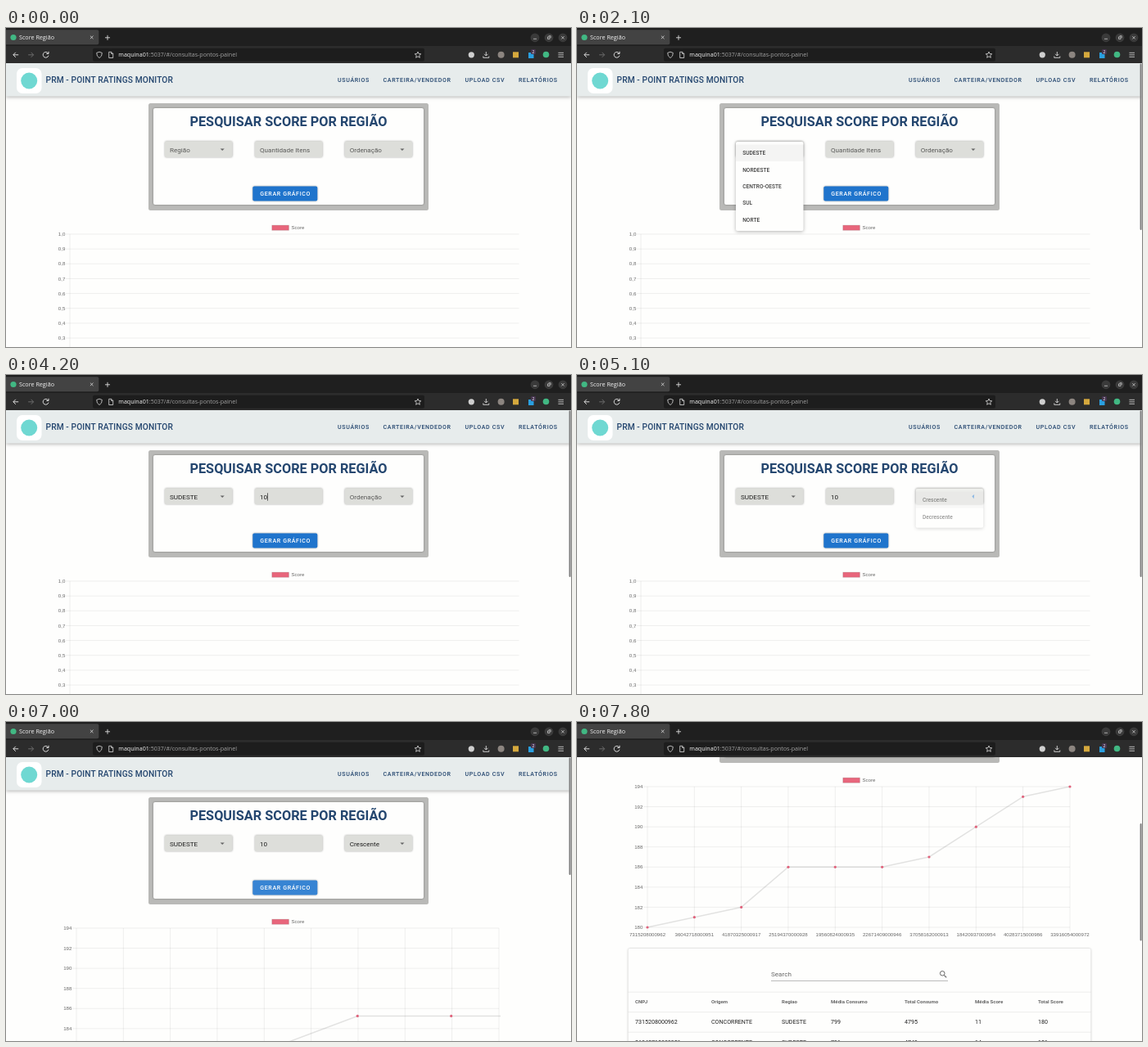
These frames come from a looping animation (690x390 px, 8000 ms). An HTML page:

```html
<!DOCTYPE html>
<html lang="pt">
<head>
<meta charset="utf-8">
<title>Score Região</title>
<style>
html, body { margin: 0; width: 100%; height: 100%; overflow: hidden; background: #fefefe; }
svg { display: block; width: 690px; height: 390px; }
text { font-family: Roboto, sans-serif; white-space: pre; }
.ui { font-family: "Open Sans", sans-serif; }
.chart { font-family: "Liberation Sans", Arial, sans-serif; font-size: 6.1px; fill: #666; }
.caps { font-size: 7.1px; font-weight: 500; letter-spacing: .64px; }
.field { font-size: 8.1px; }
.item { font-size: 6.6px; font-weight: 500; }
.sh1 { filter: drop-shadow(0 .8px .8px rgba(0,0,0,.35)); }
.sh2 { filter: drop-shadow(0 1.6px 2px rgba(0,0,0,.3)); }
</style>
</head>
<body>
<svg id="stage" viewBox="0 0 690 390">
  <defs>
    <clipPath id="view"><rect y="43" width="690" height="347"/></clipPath>
    <clipPath id="plot"><rect x="85" y="251" width="519" height="174.5"/></clipPath>
  </defs>
</svg>
<script>
(() => {
const LOOP = 8000;
const stage = document.getElementById('stage');

function el(parent, tag, attrs = {}, txt) {
  const n = document.createElementNS('http://www.w3.org/2000/svg', tag);
  set(n, attrs);
  if (txt !== undefined) n.textContent = txt;
  parent.appendChild(n);
  return n;
}
function set(n, attrs) { for (const k in attrs) n.setAttribute(k, attrs[k]); }
const box = (p, x, y, width, height, fill, rx = 0, more) =>
  el(p, 'rect', { x, y, width, height, fill, rx, ...more });
const dot = (p, cx, cy, r, fill) => el(p, 'circle', { cx, cy, r, fill });
const label = (p, x, y, txt, cls, fill, more) => el(p, 'text', { x, y, class: cls, fill, ...more }, txt);
const line = (p, d, stroke, w = 1, more) =>
  el(p, 'path', { d, stroke, 'stroke-width': w, fill: 'none', ...more });
const show = (n, on) => n.setAttribute('visibility', on ? 'visible' : 'hidden');

const clamp = v => Math.max(0, Math.min(1, v));
const ramp = (t, a, b) => clamp((t - a) / (b - a));
const smooth = v => v * v * (3 - 2 * v);

// cubic-bezier(.25, .8, .25, 1)
function swift(x) {
  if (x <= 0 || x >= 1) return clamp(x);
  let lo = 0, hi = 1;
  for (let i = 0; i < 24; i++) {
    const s = (lo + hi) / 2;
    if (.75 * s * (1 - s) + s ** 3 < x) lo = s; else hi = s;
  }
  const s = lo, u = 1 - s;
  return 2.4 * u * u * s + 3 * u * s * s + s ** 3;
}

// ---- page ----
const view = el(stage, 'g', { 'clip-path': 'url(#view)' });
box(view, 0, 43, 690, 347, '#fefefd');
const page = el(view, 'g');
const ink = 'rgba(0,0,0,.87)', dim = 'rgba(0,0,0,.6)', navy = '#24466f';

box(page, 0, 42, 690, 41.5, '#e7ecec', 0, { class: 'sh2' });
box(page, 13, 49, 30.5, 31, '#fff', 7);
dot(page, 28.2, 64.5, 10, '#6fd8d2');
label(page, 48.5, 67.4, 'PRM - POINT RATINGS MONITOR', '', navy,
  { 'font-size': 10.2, 'font-weight': 500, 'letter-spacing': .13 });
[[405, 'USUÁRIOS'], [460.5, 'CARTEIRA/VENDEDOR'], [560.5, 'UPLOAD CSV'], [626, 'RELATÓRIOS']]
  .forEach(([x, s]) => label(page, x, 66.3, s, 'caps', navy));

// ---- chart ----
const TOP = 252, BOTTOM = 424, LEFT = 86, STEP = 57.33, RIGHT = LEFT + 9 * STEP;
const scores = [180, 181, 182, 186, 186, 186, 187, 190, 193, 194];
const ids = ['7315208000962', '36042718000951', '41870325000917', '25194370000928', '19560824000935',
  '22671409000946', '37058162000913', '18420937000954', '40283715000986', '33916054000972'];
const grid = 'rgba(0,0,0,.11)';

box(page, 324.8, 241.2, 20.6, 6.1, '#e8667c', 0, { stroke: 'rgba(0,0,0,.12)', 'stroke-width': 1 });
label(page, 348.4, 246.2, 'Score', 'chart', '#666');

function axis(g, left, right, step, count, name) {
  for (let i = 0; i < count; i++) {
    const y = TOP + i * step;
    line(g, `M${left - 5} ${y}H${right}`, grid, .6);
    label(g, left - 5.7, y + 2.1, name(i), 'chart', '#666', { 'text-anchor': 'end' });
  }
}
const blank = el(page, 'g');
axis(blank, 78, 626.5, 18.15, 9, i => ((10 - i) / 10).toFixed(1).replace('.', ','));
line(blank, 'M78 252V433', grid, .6);

const filled = el(page, 'g');
axis(filled, LEFT, RIGHT, (BOTTOM - TOP) / 7, 8, i => 194 - 2 * i);
ids.forEach((id, i) => {
  const x = LEFT + i * STEP;
  line(filled, `M${x} ${TOP}V${BOTTOM + 5}`, grid, .6);
  label(filled, x, 435.1, id, 'chart', '#666', { 'text-anchor': 'middle' });
});
const plot = el(filled, 'g', { 'clip-path': 'url(#plot)' });
const curve = line(plot, '', 'rgba(0,0,0,.11)', 1.5, { 'stroke-linejoin': 'round' });
const marks = scores.map(() => dot(filled, 0, 0, 1.6, '#e0637c'));

// left: share of the entry motion still to go
function drawChart(left) {
  const spread = 1 + 8 * left;
  const pts = scores.map((v, i) => {
    const y = BOTTOM - (v - 180) / 14 * (BOTTOM - TOP);
    return [LEFT + i * STEP * spread, y + (BOTTOM - y) * left];
  });
  set(curve, { d: 'M' + pts.map(p => p[0].toFixed(2) + ' ' + p[1].toFixed(2)).join('L') });
  pts.forEach(([cx, cy], i) => {
    set(marks[i], { cx, cy });
    show(marks[i], left < 1 && cx < RIGHT + 1);
  });
}

// ---- table ----
const table = el(page, 'g');
box(table, 62.5, 450, 565, 200, '#fefefd', 2,
  { style: 'filter:drop-shadow(0 .5px 1.2px rgba(0,0,0,.28))' });
label(table, 237, 484.4, 'Search', 'field', dim);
line(table, 'M237 489.5H453', '#8f8f8f', .6);
line(table, 'M448.4 482.6L451.2 485.4', '#666', 1.2);
el(table, 'circle', { cx: 446.2, cy: 480.3, r: 2.8, fill: 'none', stroke: '#666', 'stroke-width': 1 });
const cols = [71, 164, 250, 310, 400, 486, 563];
const heads = ['CNPJ', 'Origem', 'Regiao', 'Média Consumo', 'Total Consumo', 'Média Score', 'Total Score'];
const rows = [[ids[0], 'CONCORRENTE', 'SUDESTE', 799, 4795, 11, 180],
  [ids[1], 'CONCORRENTE', 'SUDESTE', 791, 4749, 14, 181]];
cols.forEach((x, c) => {
  label(table, x, 517.4, heads[c], '', dim, { 'font-size': 6.1, 'font-weight': 700 });
  rows.forEach((r, i) => label(table, x, 542.3 + i * 24.5, r[c], '', ink, { 'font-size': 7.1 }));
});
[503.2, 527.7, 552.2].forEach(y => line(table, `M62.5 ${y}H627.5`, 'rgba(0,0,0,.12)', .6));

// ---- form ----
box(page, 174, 92, 342, 131, '#b9b9b7', 2.5);
box(page, 180, 98, 330, 118, '#fefefd', 2, { class: 'sh1' });
label(page, 345, 120.1, 'PESQUISAR SCORE POR REGIÃO', '', navy,
  { 'font-size': 16.3, 'font-weight': 700, 'text-anchor': 'middle' });

function field(x, hint, value, arrow) {
  box(page, x, 138.5, 82.5, 19.5, '#dddeda', 2, { class: 'sh1' });
  return {
    hint: label(page, x + 6, 151.9, hint, 'field', dim),
    value: label(page, x + 6, 151.9, value, 'field', ink),
    arrow: arrow && el(page, 'path', { d: 'M-2.55 -1H2.55L0 1.55Z' }),
    x
  };
}
const region = field(194, 'Região', 'SUDESTE', true);
const amount = field(304, 'Quantidade Itens', '10');
const order = field(413.7, 'Ordenação', 'Crescente', true);
const caret = box(page, 310, 144.3, .7, 9.4, '#222');

const button = box(page, 301.3, 193.5, 79, 18, '#1f74cc', 2, { class: 'sh1' });
label(page, 310.2, 205.1, 'GERAR GRÁFICO', 'caps', '#fff');

function menu(x, names) {
  const g = el(page, 'g');
  box(g, x, 139, 82.5, 7 + names.length * 20.4, '#fefefd', 2, { class: 'sh2' });
  const active = box(g, x, 142.5, 82.5, 20.4, '#000');
  const items = names.map((s, i) => label(g, x + 8.2, 155.2 + i * 20.4, s, 'item', 'rgba(0,0,0,.75)'));
  return { g, active, first: items[0] };
}
const regionMenu = menu(194, ['SUDESTE', 'NORDESTE', 'CENTRO-OESTE', 'SUL', 'NORTE']);
const orderMenu = menu(413.7, ['Crescente', 'Decrescente']);

function drawSelect(t, f, m, open, close, blur) {
  const shown = swift(ramp(t, open, open + 300)) - swift(ramp(t, close, close + 300));
  const picked = t >= close - 15;
  show(f.hint, t < open);
  show(f.value, picked);
  set(f.arrow, {
    transform: `translate(${f.x + 70.2} 148.5) rotate(${180 * shown})`,
    fill: t >= open && t < blur ? '#1976d2' : '#666'
  });
  show(m.g, shown > .001);
  set(m.g, { opacity: shown });
  set(m.active, { fill: picked ? '#1976d2' : '#000', opacity: picked ? .24 : .04 });
  set(m.first, { fill: picked ? '#1976d2' : 'rgba(0,0,0,.75)' });
}

const bar = box(view, 687.6, 43.5, 2, 204, '#7d7d7d', 1);

// ---- browser window ----
const shell = el(stage, 'g');
const pale = '#dcdcdc';
box(shell, 0, 0, 690, 22.5, '#1f1f1f');
box(shell, 0, 22, 690, 21, '#2c2c2c');
box(shell, -2, 2.3, 115.3, 18, '#434343', 2);
dot(shell, 9, 11.5, 3.6, '#41b883');
label(shell, 16, 14.1, 'Score Região', 'ui', '#f2f2f2', { 'font-size': 7.2 });
line(shell, 'M102.9 9.6l3.6 3.6m0-3.6l-3.6 3.6', pale, .8);
line(shell, 'M124 8.8v6m-3-3h6', pale, .9);
[646, 663, 680].forEach(x => dot(shell, x, 11.8, 5.4, '#3a3a3a'));
line(shell, 'M644 13.3h4M661.5 10.9h2.5v2.5h-2.5zM662.7 9.7h2.5v2.5M678.3 10.1l3.4 3.4m0-3.4l-3.4 3.4', pale, .7);

line(shell, 'M15.2 32.8H8.9M11.8 29.8l-3 3l3 3', pale);
line(shell, 'M27.2 32.8h6.3M30.6 29.8l3 3l-3 3', '#6c6c6c');
line(shell, 'M51.5 31a3.4 3.4 0 1 0 .4 2.6M52 28.8v2.7h-2.7', pale);
box(shell, 106, 24.8, 405, 16, '#1d1d1d', 2);
line(shell, 'M114 29.2l3.3 1.2q.2 4.4-3.3 6.2q-3.5-1.8-3.3-6.2z', pale, .8);
line(shell, 'M125.7 29.3h3l2 2v5.2h-5zM128.6 29.5v2h2', pale, .8);
const address = label(shell, 137.3, 35.4, '', 'ui', '#a2a2a2', { 'font-size': 7.1 });
el(address, 'tspan', { fill: '#f4f4f4' }, 'maquina01');
el(address, 'tspan', {}, ':5037/#/consultas-pontos-painel');
const star = Array.from({ length: 10 }, (_, i) => {
  const a = i * Math.PI / 5, r = i % 2 ? 1.8 : 4;
  return (503 + r * Math.sin(a)).toFixed(2) + ' ' + (33 - r * Math.cos(a)).toFixed(2);
});
line(shell, 'M' + star.join('L') + 'Z', pale, .8, { 'stroke-linejoin': 'round' });

dot(shell, 568.3, 32.8, 3.6, '#cfcfcf');
line(shell, 'M586.3 29v5m-2.2-2.2l2.2 2.2l2.2-2.2M582.8 34.5v1.8h7v-1.8', pale, .9);
dot(shell, 604.6, 32.8, 4, '#8c8580');
box(shell, 619, 29.3, 7, 7, '#d5a83d');
box(shell, 638, 30, 6.5, 7, '#2a9fe0');
box(shell, 641, 26, 6, 6, '#46344f', 1.2);
label(shell, 644, 30.9, '2', 'ui', '#fff', { 'font-size': 5, 'text-anchor': 'middle' });
dot(shell, 659.5, 32.5, 3.8, '#41b883');
line(shell, 'M674.4 30.3h6.6m-6.6 2.5h6.6m-6.6 2.5h6.6', pale, .8);

// ---- motion ----
function draw(t) {
  drawSelect(t, region, regionMenu, 1650, 2700, 3350);
  drawSelect(t, order, orderMenu, 5050, 5680, 6150);

  const typed = t >= 4150;
  show(amount.hint, t < 3350);
  show(amount.value, typed);
  show(caret, t >= 3350 && t < 4690);
  set(caret, { x: typed ? 319.2 : 310 });

  set(button, { fill: t < 6050 ? '#1f74cc' : t < 6150 ? '#2c7dd0' : '#3784d3' });

  const loaded = t >= 6595;
  show(blank, !loaded);
  show(filled, loaded);
  show(table, loaded);
  drawChart(loaded ? (1 - ramp(t, 6595, 7595)) ** 4 : 1);

  const scroll = smooth(ramp(t, 7220, 7800));
  set(page, { transform: `translate(0 ${-173 * scroll})` });
  set(bar, { y: 43.5 + 80.5 * scroll, height: loaded ? 143.5 : 203.5, opacity: ramp(t, 350, 600) });
}

function tick() {
  draw(performance.now() % LOOP);
  requestAnimationFrame(tick);
}
tick();
})();
</script>
</body>
</html>
```
